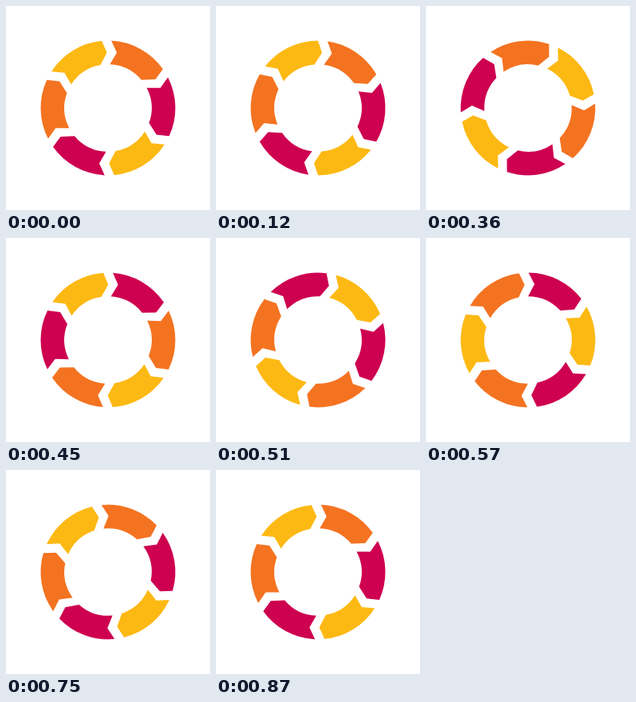
Recreate the animation shown at these times as an HTML page with a canvas. Size 256 by 256 pixels, loop 900 ms.

```html
<!DOCTYPE html>
<html lang="en">
<head>
<meta charset="utf-8">
<title>Loading ring</title>
<style>
  html, body { margin: 0; height: 100%; overflow: hidden; background: #fff; }
  canvas { display: block; }
</style>
</head>
<body>
<canvas id="stage" width="256" height="256"></canvas>
<script>
const ctx = document.getElementById('stage').getContext('2d');
const ORANGE = '#f47321', CRIMSON = '#ce0050', YELLOW = '#fdb913';
const COLORS = [ORANGE, CRIMSON, YELLOW, CRIMSON, ORANGE, YELLOW];
const LOOP = 900, OUTER = 84.5, INNER = 54.8;
const rad = deg => deg * Math.PI / 180;

// Symmetric ease, equal to cubic-bezier(.7, 0, .3, 1).
function ease(x) {
  let lo = 0, hi = 1;
  for (let i = 0; i < 24; i++) {
    const s = (lo + hi) / 2, r = 1 - s;
    if (2.1 * s * r * r + 0.9 * s * s * r + s ** 3 < x) lo = s; else hi = s;
  }
  return lo * lo * (3 - 2 * lo);
}

function lineToPolar(radius, deg) {
  ctx.lineTo(radius * Math.cos(rad(deg)), radius * Math.sin(rad(deg)));
}

// Curved arrow pointing clockwise, with a notched tail.
function drawArrow(color) {
  ctx.beginPath();
  ctx.arc(0, 0, OUTER, rad(2.85), rad(54.7));
  lineToPolar(69.5, 58.9);
  ctx.arc(0, 0, INNER, rad(50), rad(2.5), true);
  lineToPolar(70.4, 9);
  ctx.fillStyle = color;
  ctx.fill();
}

function draw() {
  const progress = performance.now() % LOOP / LOOP;
  ctx.clearRect(0, 0, 256, 256);
  ctx.save();
  ctx.translate(128, 128);
  ctx.rotate(rad(360 * ease(progress) - 90));
  for (const color of COLORS) {
    drawArrow(color);
    ctx.rotate(rad(60));
  }
  ctx.restore();
  requestAnimationFrame(draw);
}
draw();
</script>
</body>
</html>
```
